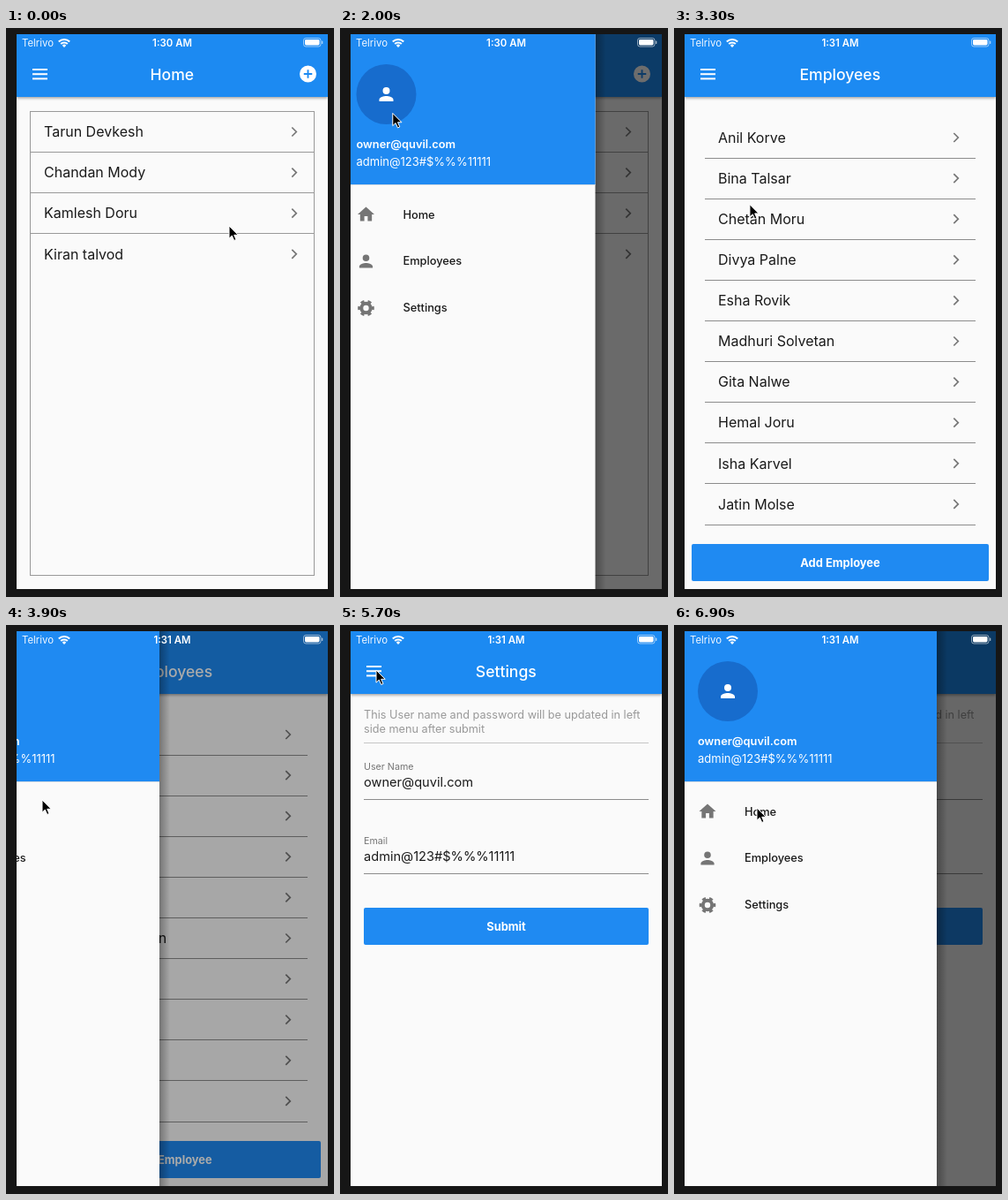
These frames come from a looping animation (372x644 px, 7000 ms). An HTML page:

```html
<!DOCTYPE html>
<html lang="en">
<head>
<meta charset="utf-8">
<title>Employee app</title>
<style>
html, body { margin: 0; width: 100%; height: 100%; overflow: hidden; background: #161616; }
svg { display: block; width: 372px; height: 644px; font-family: Inter, Roboto, sans-serif; }
text { white-space: pre; }
</style>
</head>
<body>
<svg id="stage" viewBox="0 0 372 644"></svg>
<script>
const BLUE = '#1f8af2', PAPER = '#fafafa', INK = '#1a1a1a', GREY = '#757575';
const LOOP = 7000, STEP = 100, DRAWER = 286;
const EMAIL = 'owner@quvil.com', CODE = 'admin@123#$%%%11111';

// y is the middle of the capitals
const text = (s, x, y, size, fill = INK, weight = 400, anchor = 'start') =>
  `<text x="${x}" y="${y + size * .36}" font-size="${size}" font-weight="${weight}" fill="${fill}" text-anchor="${anchor}">${s}</text>`;
const rect = (x, y, w, h, fill, more = '') =>
  `<rect x="${x}" y="${y}" width="${w}" height="${h}" fill="${fill}" ${more}/>`;
const rule = (x1, x2, y, color) => rect(x1, y, x2 - x1, 1, color);
const chevron = (x, y) =>
  `<path d="M${x - 2.7} ${y - 5}l5 5-5 5" fill="none" stroke="#777" stroke-width="1.7"/>`;
const icon = (d, x, y, scale, fill) =>
  `<path d="${d}" fill="${fill}" transform="translate(${x} ${y}) scale(${scale}) translate(-12 -12)"/>`;
const button = (label, x, y, w) =>
  rect(x, y, w, 42, BLUE, 'rx="2"') + text(label, 188.5, y + 21, 12.9, '#fff', 700, 'middle');

const HOME = 'M10 20v-6h4v6h5v-8h3L12 3 2 12h3v8z';
const PERSON = 'M12 12a4 4 0 1 0 0-8 4 4 0 0 0 0 8zm0 2c-2.67 0-8 1.34-8 4v2h16v-2c0-2.66-5.33-4-8-4z';
const PLUS = 'M12 2a10 10 0 1 0 0 20 10 10 0 0 0 0-20zm5 11h-4v4h-2v-4H7v-2h4V7h2v4h4z';
const gear = (x, y) => `<g transform="translate(${x} ${y})" fill="none" stroke="${GREY}">
  <circle r="5.2" stroke-width="4"/>
  <circle r="7.7" stroke-width="3.2" pathLength="12" stroke-dasharray="1" stroke-dashoffset=".5"/></g>`;

const appBar = title => `<g filter="url(#lift)">${rect(12, 7, 353, 71, BLUE)}</g>
  ${[46, 51.2, 56.4].map(y => rect(30, y, 17, 2, '#fff')).join('')}
  ${text(title, 188.3, 52.5, 17.6, '#fff', 500, 'middle')}`;

const people = ['Tarun Devkesh', 'Chandan Mody', 'Kamlesh Doru', 'Kiran talvod'];
const staff = ['Anil Korve', 'Bina Talsar', 'Chetan Moru', 'Divya Palne', 'Esha Rovik',
  'Madhuri Solvetan', 'Gita Nalwe', 'Hemal Joru', 'Isha Karvel', 'Jatin Molse'];

const homePage = appBar('Home') + icon(PLUS, 342.5, 52, .95, '#fff') +
  rect(27.5, 94.5, 322, 525, 'none', 'stroke="#999"') +
  people.map((name, i) => {
    const y = 117.5 + 46.1 * i;
    return text(name, 43, y, 16) + chevron(327, y) +
      (i ? rule(28, 349, Math.round(y - 23.6), '#999') : '');
  }).join('');

const staffPage = appBar('Employees') + '<g id="list">' +
  staff.map((name, i) => {
    const y = 124 + 46.1 * i;
    return text(name, 50, y, 16) + chevron(320, y) + rule(35, 342, Math.round(y + 22.6), '#8c8c8c');
  }).join('') + '</g>' +
  `<circle id="spinner" cx="188.5" cy="329" r="17.5" fill="none" stroke="${BLUE}" stroke-width="4" pathLength="360"/>` +
  button('Add Employee', 20, 584, 337);

const field = (label, value, y) =>
  text(label, 27, y, 10.7, GREY) + text(value, 27, y + 17.5, 14.6) + rule(27, 350, y + 37, '#8c8c8c');
const settingsPage = appBar('Settings') +
  text('This User name and password will be updated in left', 27, 101.5, 12.7, '#999') +
  text('side menu after submit', 27, 117.5, 12.7, '#999') +
  rule(27, 350, 133, '#c6c6c6') +
  field('User Name', EMAIL, 160) + field('Email', CODE, 244) +
  button('Submit', 27, 320, 323);

const drawerBody = rect(298, 7, 12, 628, 'url(#edge)') + rect(12, 7, DRAWER, 628, PAPER) +
  rect(12, 7, DRAWER, 170, BLUE) + rule(12, 298, 177, '#d4dbe2') +
  '<circle cx="61" cy="75" r="34" fill="#176ccd"/>' + icon(PERSON, 61, 75, 1, '#fff') +
  text(EMAIL, 27, 131, 12.8, '#fff', 600) + text(CODE, 27, 151, 13, '#fff') +
  '<g clip-path="url(#row)"><circle id="ink" fill="#e8e8e8"/></g>' +
  icon(HOME, 38, 211, .95, GREY) + icon(PERSON, 38, 264, .95, GREY) + gear(38, 317) +
  ['Home', 'Employees', 'Settings'].map((s, i) => text(s, 80, 211 + 52.8 * i, 12.8, INK, 500)).join('');

const statusBar = text('Telrivo', 18, 17, 11.4, '#eef6ff') +
  `<g fill="none" stroke="#fff" stroke-width="2.1">
    <path d="M59.8 15.6a8.8 8.8 0 0 1 12.4 0M62.2 18.1a5.4 5.4 0 0 1 7.6 0"/></g>
  <path d="M66 22l-2.2-2.3a3.1 3.1 0 0 1 4.4 0z" fill="#fff"/>
  <text id="clock" x="188.5" y="20.8" font-size="11.4" font-weight="600" fill="#fff" text-anchor="middle"></text>` +
  rect(337.5, 11.5, 19.5, 9.5, 'none', 'rx="2.6" stroke="#fff" stroke-opacity=".55"') +
  rect(339, 13, 16.5, 6.5, '#fff', 'rx="1.4"') + rect(358, 14.5, 1.3, 3.5, '#fff', 'rx=".6" opacity=".6"');

const $ = id => document.getElementById(id);
$('stage').innerHTML = `<defs>
  <clipPath id="screen">${rect(12, 7, 353, 628, '#000')}</clipPath>
  <clipPath id="bar">${rect(12, 7, 353, 71, '#000')}</clipPath>
  <clipPath id="row"><rect id="rowBox" x="12" width="${DRAWER}" height="53"/></clipPath>
  <linearGradient id="edge"><stop stop-opacity=".3"/><stop offset="1" stop-opacity="0"/></linearGradient>
  <filter id="lift" x="-5%" y="-5%" width="110%" height="120%">
    <feDropShadow dx="0" dy="1.5" stdDeviation="1.5" flood-opacity=".35"/></filter>
  </defs>
  ${rect(0, 0, 372, 644, '#161616')}
  <g clip-path="url(#screen)">
    ${rect(12, 7, 353, 628, PAPER)}
    <g id="page0">${homePage}</g><g id="page1">${staffPage}</g><g id="page2">${settingsPage}</g>
    <g clip-path="url(#bar)"><circle id="ripple" cx="38" cy="52" fill="#bcbcbc"/></g>
    ${rect(12, 7, 353, 628, '#000', 'id="scrim"')}
    <g id="drawer">${drawerBody}</g>
    ${statusBar}
  </g>
  <path id="cursor" d="M0 0V14.2L3.3 11.1 5.7 16.5 8 15.5 5.7 10.3H10.2Z" stroke="#fff" stroke-width="1" stroke-linejoin="round"/>`;

// [time, x, y] of the pointer
const path = [[300, 253, 224], [1000, 82, 97], [1100, 80, 92], [1200, 80, 92], [1600, 45, 42],
  [1800, 45, 42], [2400, 102, 252], [3100, 102, 252], [3700, 40, 50], [3800, 40, 70],
  [3900, 41, 198], [4000, 54, 258], [4400, 88, 322], [4700, 88, 322], [5500, 43, 49],
  [5600, 42, 50], [5700, 41, 51], [5900, 41, 51], [6600, 93, 205], [6900, 94, 207]];
// [time, open]
const slides = [[1760, 1], [2630, 0], [3815, 1], [4647, 0], [5920, 1]];
const menuTaps = [1600, 3700, 5870];
// [time, x, y, row top]
const itemTaps = [[2500, 100, 256, 237.5], [4558, 89, 323, 290.3]];

const show = (id, on) => $(id).setAttribute('display', on ? 'inline' : 'none');
const set = (id, attrs) => {
  for (const k in attrs) $(id).setAttribute(k, attrs[k]);
};

function pointer(t) {
  const i = path.findIndex(p => p[0] > t);
  if (i < 1) return i ? path[path.length - 1].slice(1) : path[0].slice(1);
  const [t0, x0, y0] = path[i - 1], [t1, x1, y1] = path[i];
  const u = (t - t0) / (t1 - t0), e = u * u * (3 - 2 * u);
  return [x0 + (x1 - x0) * e, y0 + (y1 - y0) * e];
}

// critically damped spring
function drawerOpen(t) {
  const last = slides.filter(s => s[0] <= t).pop();
  if (!last) return 0;
  const s = (t - last[0]) * .02236;
  let k = 1 - (1 + s) * Math.exp(-s);
  if (k > .985) k = 1;
  return last[1] ? k : 1 - k;
}

function draw(t) {
  const page = t < 2640 ? 0 : t < 4640 ? 1 : 2;
  for (let i = 0; i < 3; i++) show('page' + i, i === page);

  const loading = t < 3000, age = Math.max(0, t - 2660);
  show('list', !loading);
  show('spinner', loading);
  const sweep = .3 * age + .0012 * age * age;
  set('spinner', {
    'stroke-dasharray': `${sweep} ${360 - sweep}`,
    transform: `rotate(${.23 * age - 90} 188.5 329)`
  });

  const open = drawerOpen(t);
  show('drawer', open > 0);
  set('drawer', { transform: `translate(${(open - 1) * DRAWER} 0)` });
  set('scrim', { opacity: .59 * open });

  const tap = menuTaps.find(s => t > s && t < s + 400);
  show('ripple', tap);
  if (tap) set('ripple', {
    r: Math.min(33, (t - tap) * .33),
    opacity: .13 * Math.min(1, (tap + 400 - t) / 300)
  });

  const press = itemTaps.find(s => t > s[0] && t < s[0] + 500);
  show('ink', press);
  if (press) {
    set('ink', { cx: press[1], cy: press[2], r: (t - press[0]) * .33 });
    set('rowBox', { y: press[3] });
  }

  $('clock').textContent = t < 3000 ? '1:30 AM' : '1:31 AM';
  set('cursor', { transform: `translate(${pointer(t)})` });
}

const start = performance.now();
function tick() {
  const t = (performance.now() - start) % LOOP;
  draw(Math.floor(t / STEP) * STEP);
  requestAnimationFrame(tick);
}
tick();
</script>
</body>
</html>
```
